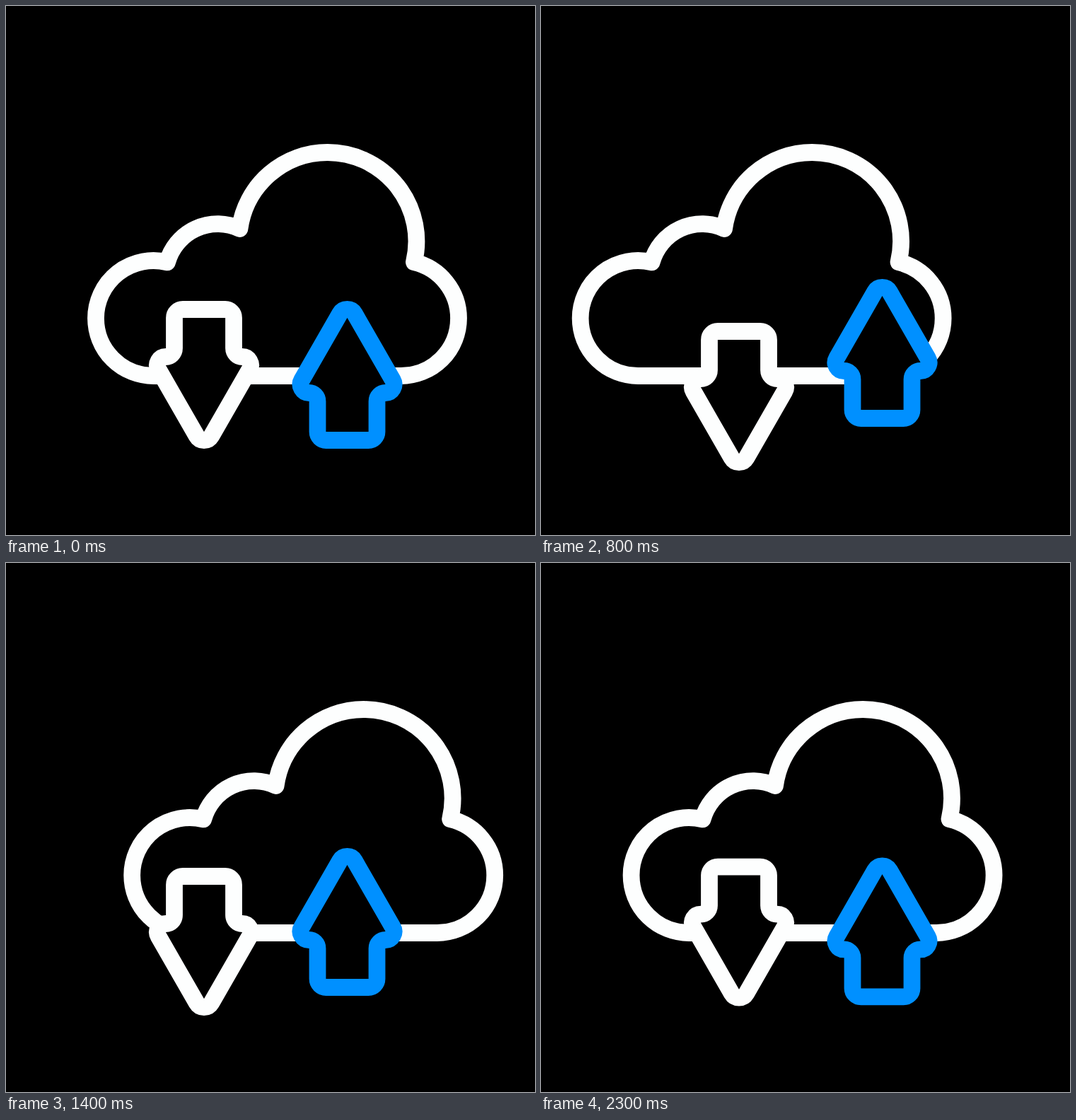
An HTML page for the animation above (2400 ms loop, 748 px wide and 748 px high).

```html
<!DOCTYPE html>
<html lang="en">
<head>
<meta charset="utf-8">
<title>Cloud transfer</title>
<style>
  html, body { margin: 0; width: 100%; height: 100%; overflow: hidden; background: #000; }
  svg { display: block; width: 100%; height: 100%; }
  path { fill: #000; stroke: #fdfefe; stroke-width: 23.8; stroke-linejoin: round; }
  #arrow { stroke: inherit; }
  #down { stroke: #fdfefe; }
  #up { stroke: #0090ff; }
</style>
</head>
<body>
<svg viewBox="0 0 748 748">
  <defs>
    <path id="arrow" d="M238 484V441a12 12 0 0 1 12-12H310a12 12 0 0 1 12 12V484
      a12 12 0 0 0 12 12a12 12 0 0 1 10.4 18L290.4 608a12 12 0 0 1-20.8 0L215.6 514
      a12 12 0 0 1 10.4-18a12 12 0 0 0 12-12Z"/>
  </defs>
  <path id="cloud" d="M208.5 523A81.5 81.5 0 0 1 127 441.5A81.5 81.5 0 0 1 228 362.4
    A74 74 0 0 1 330.4 315A125.7 125.7 0 0 1 454.6 207A125.7 125.7 0 0 1 576.9 362.2
    A81.5 81.5 0 0 1 640 441.5A81.5 81.5 0 0 1 558.5 523Z"/>
  <g id="down"><use href="#arrow"/></g>
  <g id="up"><use href="#arrow" transform="translate(202.5 1043) scale(1 -1)"/></g>
</svg>
<script>
  const LOOP = 2400, STEP = 100;

  // [time in ms, offset in px]
  const drift = [[0, 0], [768, -72], [1585, 69.7], [2340, 0], [LOOP, 0]];
  const bob = [[0, 0], [575, 45], [1181, 0], [1771, 45], [2338, 0], [LOOP, 0]];

  const ease = x => x * x * (3 - 2 * x);

  function valueAt(keys, t) {
    const i = keys.findIndex(k => k[0] > t);
    const [t0, v0] = keys[i - 1], [t1, v1] = keys[i];
    return v0 + (v1 - v0) * ease((t - t0) / (t1 - t0));
  }

  const part = id => document.getElementById(id);
  const cloud = part("cloud"), down = part("down"), up = part("up");
  const move = (el, x, y) => el.setAttribute("transform", `translate(${x} ${y})`);

  function draw(now) {
    // The picture changes in steps of 100 ms.
    const t = Math.floor((now % LOOP) / STEP) * STEP;
    const y = valueAt(bob, t);
    move(cloud, valueAt(drift, t), 0);
    move(down, 0, y);
    move(up, 0, -y);
  }

  let start;
  function tick(now) {
    start ??= now;
    draw(now - start);
    requestAnimationFrame(tick);
  }
  draw(0);
  requestAnimationFrame(tick);
</script>
</body>
</html>
```
